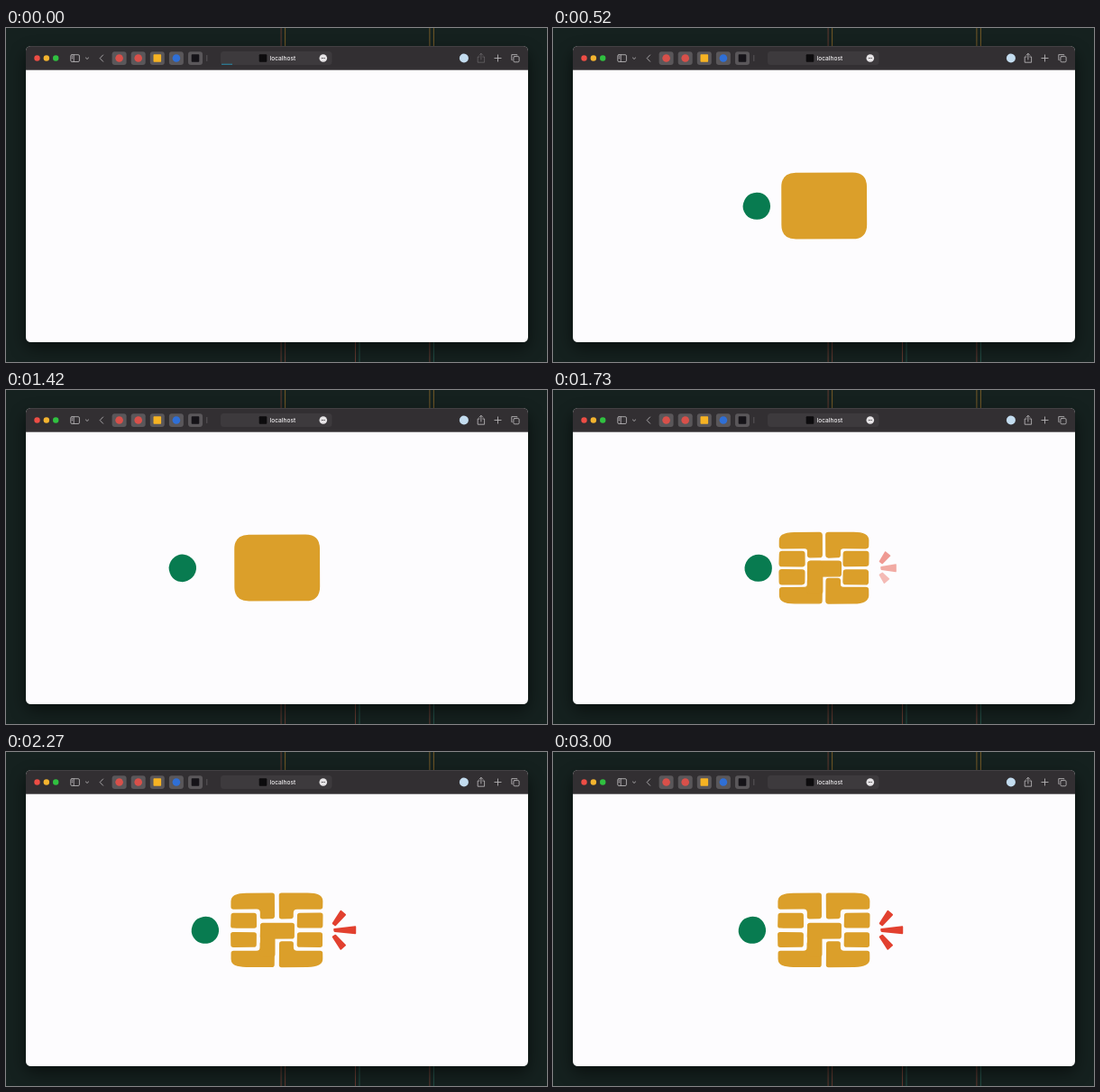
Animation of 600 by 371 pixels, one loop 3.03 s. Source, as an HTML page:

```html
<!DOCTYPE html>
<html lang="en">
<head>
<meta charset="utf-8">
<title>Chip strike</title>
<style>
html, body { margin: 0; width: 100%; height: 100%; overflow: hidden; background: #15211f; }
svg { display: block; width: 100vw; height: 100vh; }
text { font: 500 6.6px Inter, "Liberation Sans", sans-serif; fill: #f1eff1; }
.line { fill: none; stroke: #b4b1b4; stroke-width: .9; stroke-linecap: round; stroke-linejoin: round; }
</style>
</head>
<body>
<svg viewBox="0 0 600 371">
  <defs>
    <filter id="shade" x="-10%" y="-10%" width="120%" height="130%">
      <feGaussianBlur stdDeviation="9"/>
    </filter>
    <clipPath id="frame"><rect x="22" y="20" width="557" height="329" rx="5.5"/></clipPath>
  </defs>
  <rect width="600" height="371" fill="#15211f"/>
  <g id="wires" opacity=".8"></g>
  <rect x="21" y="27" width="559" height="329" rx="8" opacity=".5" filter="url(#shade)"/>

  <g clip-path="url(#frame)">
    <rect x="22" y="20" width="557" height="329" fill="#fdfcfe"/>
    <rect x="22" y="20" width="557" height="26.7" fill="#322f32"/>
    <rect x="22" y="20" width="557" height=".7" fill="#4b484b"/>
  </g>

  <g id="lights"></g>
  <g class="line">
    <rect x="71.8" y="29.7" width="9.6" height="7.8" rx="1.3"/>
    <path d="M75.2 29.7v7.8M73 31.8h.9M73 33.4h.9"/>
    <path d="M88.4 33l1.6 1.5 1.6-1.5"/>
    <path d="M107.6 30l-3.4 3.6 3.4 3.6"/>
    <path d="M222.8 30.5v6" stroke="#5f5c5f"/>
    <path id="share" d="M525 32h-1.8v6.2h7.4v-6.2h-1.8M526.9 35v-6.5M525 30.2l1.9-1.9 1.9 1.9"/>
    <path d="M541.9 33.5h7.2M545.5 29.9v7.2"/>
    <path d="M561.2 35.6h-.4v-6h6v.5"/>
    <rect x="562.9" y="31.6" width="6.2" height="6.2" rx="1.2"/>
  </g>
  <g id="pins"></g>

  <rect x="238" y="26" width="123.5" height="15" rx="3.5" fill="#3d3a3d"/>
  <rect id="load" x="239" y="39.7" height="1.3" fill="#2d7890"/>
  <rect x="280.7" y="29.2" width="8.6" height="8.6" rx="1" fill="#0c0b0d"/>
  <text x="292.6" y="36">localhost</text>
  <circle cx="351.8" cy="33.5" r="4.3" fill="#e6e4e6"/>
  <path d="M349.8 33.5h4" stroke="#4b484b" stroke-width="1.1" stroke-dasharray="1 .5"/>
  <circle cx="507.9" cy="33.5" r="5" fill="#c3dcef"/>

  <g id="art">
    <g id="block" fill="#db9f2a"></g>
    <g id="pieces" fill="#db9f2a" stroke="#db9f2a" stroke-linejoin="round"></g>
    <g id="ball" fill="#087b50"></g>
    <g id="rays" fill="#e2402f"></g>
  </g>
</svg>
<script>
const LOOP = 3030, SHOW = 60, LOADED = 360, WIND = 1080, SWING = 1500, HIT = 1640;
const $ = id => document.getElementById(id);

function add(parent, tag, attrs) {
  const el = document.createElementNS("http://www.w3.org/2000/svg", tag);
  for (const k in attrs) el.setAttribute(k, attrs[k]);
  return $(parent).appendChild(el);
}

let seed = 7;
const wobble = () => ((seed = seed * 16807 % 2147483647) / 2147483647 - .5) * .6;

// Hand-cut outline with softened corners; a point is [x, y, radius].
function cut(parent, points, radius = 2.8) {
  const pts = points.map(([x, y, r = radius]) => [x + wobble(), y + wobble(), r]);
  const toward = (p, q) => {
    const len = Math.hypot(q[0] - p[0], q[1] - p[1]);
    const k = Math.min(p[2], len / 2) / len;
    return `${p[0] + (q[0] - p[0]) * k} ${p[1] + (q[1] - p[1]) * k}`;
  };
  const d = pts.map((p, i) =>
    `${toward(p, pts.at(i - 1))}Q${p[0]} ${p[1]} ${toward(p, pts[(i + 1) % pts.length])}`);
  return add(parent, "path", { d: `M${d.join("L")}Z` });
}

const box = (x0, y0, x1, y1) => [[x0, y0], [x1, y0], [x1, y1], [x0, y1]];

// Pairs of thin wires behind the window; the middle pair only shows below it.
for (let i = 0; i < 6; i++) {
  const pair = i >> 1, x = 304.6 + pair * 82.4 + i % 2 * 4.5;
  const fill = i % 2 && pair ? "#28594f" : "#753f35";
  add("wires", "rect", { x, y: 340, width: 1, height: 31, fill });
  if (pair !== 1) add("wires", "rect", { x, y: 0, width: 1, height: 30, fill: (i + 1) % 4 === 2 || i === 4 ? "#8d692a" : fill });
}

["#ee4d45", "#f4b42f", "#30c140"].forEach((fill, i) =>
  add("lights", "circle", { cx: 34.5 + i * 10.35, cy: 33.5, r: 3.2, fill }));

["#d8504a", "#d8504a", "#f6b323", "#2f6fd6", "#151318"].forEach((fill, i) => {
  const x = 125.6 + i * 21.1, round = i !== 2 && i !== 4;
  add("pins", "rect", { x: x - 8, y: 26.3, width: 16, height: 14.6, rx: 3, fill: "#5a575a" });
  add("pins", "rect", { x: x - 4.3, y: 29.2, width: 8.6, height: 8.6, rx: round ? 4.3 : .8, fill });
});

// Chip parts are laid out around its centre and mirrored into each quarter.
cut("block", box(-47.3, -36.9, 47.3, 36.9), 16);
for (const sx of [-1, 1]) for (const sy of [-1, 1]) {
  const quarter = pts => cut("pieces", pts.map(([x, y, r]) => [x * sx, y * sy, r]));
  quarter([[51, 41, 17], [2.5, 41.3], [2.5, 12.5], [18.5, 12.5], [18.5, 23, 4], [51, 23]]);
  quarter(box(22.5, 2.2, 51, 19.2));
}
cut("pieces", box(-18.4, -7.8, 19.6, 9.6));
cut("pieces", box(-18.4, -7.8, -2, 30));

cut("ball", Array.from({ length: 14 }, (_, i) => {
  const a = i / 7 * Math.PI;
  return [15.6 * Math.cos(a), 15.6 * Math.sin(a), 3.5];
}));

// Rays fan out from the right edge, the middle one longest.
const rays = [-1, 0, 1].map(i => {
  const side = Math.abs(i), len = 24.7 - 7.2 * side, base = 1.7 + .7 * side;
  const el = cut("rays", [[0, -base], [len, -4.3], [len, 4.3], [0, base]], 1);
  return { el, place: `translate(363.3 ${197.8 + 6 * i}) rotate(${51 * i})`, delay: 12 * (i + 1) };
});

const clamp = v => Math.max(0, Math.min(1, v));
const part = (t, a, b) => clamp((t - a) / (b - a));
const mix = (a, b, k) => a + (b - a) * k;
const settle = (t, tau) => t <= 0 ? 0 : 1 - Math.exp(-t / tau);
const sway = k => (1 - Math.cos(Math.PI * k)) / 2;

function ballX(t) {
  if (t < SWING) return mix(226, 193, sway(part(t, WIND, SWING)));
  if (t < HIT) return mix(193, 239, part(t, SWING, HIT) ** 2);
  return mix(239, 221, settle(t - HIT, 95));
}

function draw(t) {
  $("art").style.display = t < SHOW ? "none" : "";
  $("share").style.opacity = t < 300 ? .35 : 1;
  $("load").setAttribute("width", mix(12, 121, part(t, 30, 270)));
  $("load").style.opacity = 1 - part(t, 270, LOADED);

  const x = ballX(t);
  $("ball").setAttribute("transform", `translate(${x} 197.8) rotate(${(x - 226) * 1.5})`);

  // The outline stroke fills the gaps while the chip is closed.
  const s = settle(t - HIT, 80);
  $("block").style.display = s ? "none" : "";
  $("pieces").style.display = s ? "" : "none";
  $("block").setAttribute("transform", "translate(300.8 197.4)");
  $("pieces").setAttribute("stroke-width", mix(4.4, 0, s));
  $("pieces").setAttribute("transform",
    `translate(${mix(300.8, 300.3, s)} ${mix(197.4, 197.8, s)}) scale(${mix(.888, 1, s)} ${mix(.846, 1, s)})`);

  for (const { el, place, delay } of rays) {
    const age = t - HIT - delay;
    el.style.opacity = clamp(age / 150) ** 1.3;
    el.setAttribute("transform", `${place} scale(${settle(age, 65)} 1)`);
  }
}

const start = performance.now();
function tick() {
  draw((performance.now() - start) % LOOP);
  requestAnimationFrame(tick);
}
tick();
</script>
</body>
</html>
```
